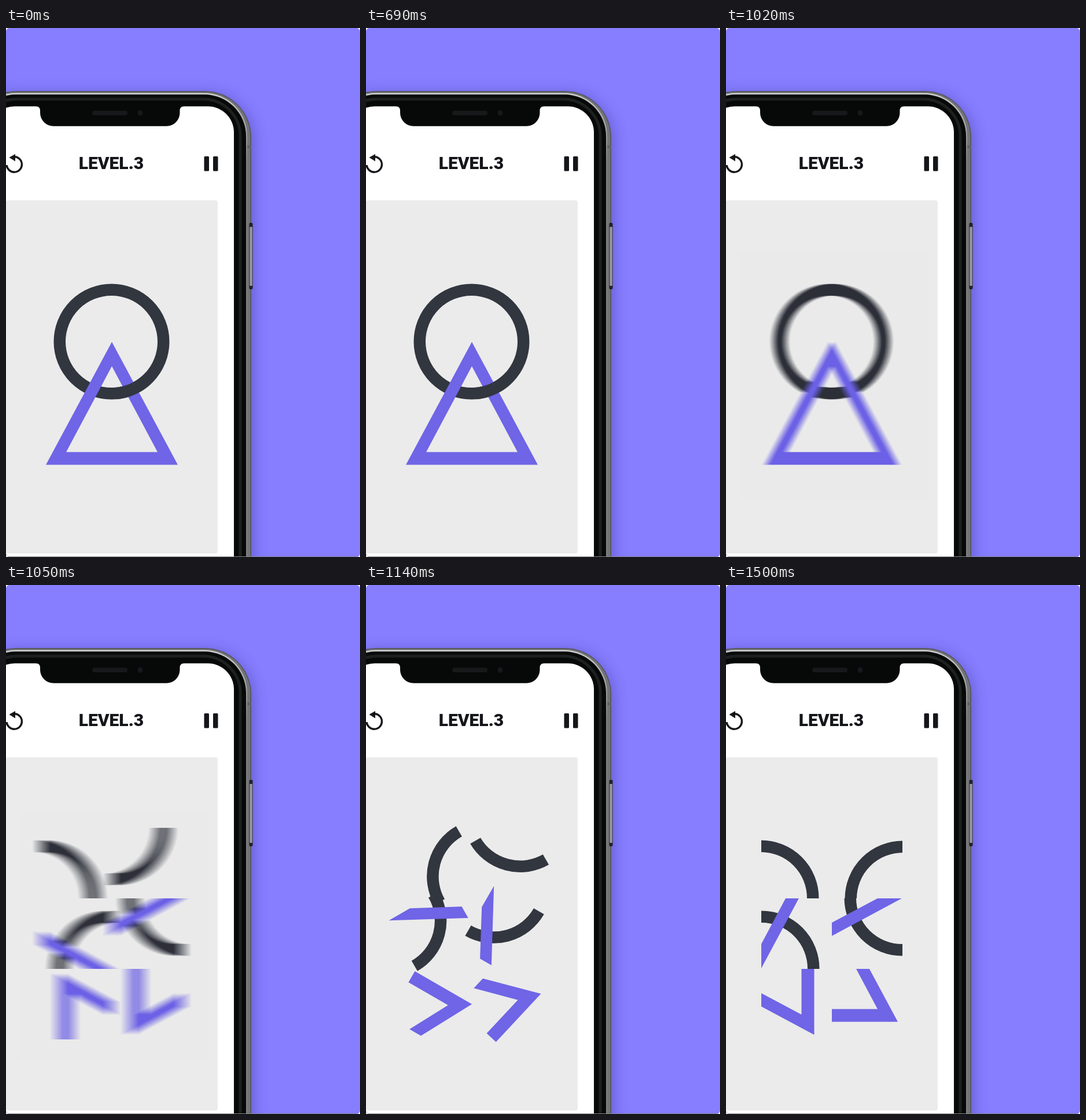
Write an HTML page with a canvas that moves like this. It is 612x915 px and loops after 1530 ms.

```html
<!DOCTYPE html>
<html lang="en">
<head>
<meta charset="utf-8">
<style>
html, body { margin: 0; width: 612px; height: 915px; overflow: hidden; background: #fff; }
canvas { display: block; }
</style>
</head>
<body>
<canvas id="stage" width="612" height="915"></canvas>
<script>
const W = 612, H = 915, LOOP = 1530, STEP = 30, TILE = 122;
const LEFT = 61, TOP = 420;
const INK = '#15161a', RING = '#31363f', PURPLE = '#6f65e6', PANEL = '#ebebeb';

const stage = document.getElementById('stage').getContext('2d');
const newLayer = () => {
  const c = document.createElement('canvas');
  c.width = W; c.height = H;
  return c.getContext('2d');
};
const backdrop = newLayer(), pieces = newLayer(), smear = newLayer();

function box(g, x, y, w, h, r, fill) {
  g.beginPath();
  g.roundRect(x, y, w, h, r);
  g.fillStyle = fill;
  g.fill();
}

function polygon(g, points) {
  points.forEach(([x, y], i) => i ? g.lineTo(x, y) : g.moveTo(x, y));
  g.closePath();
}

function gradient(g, x0, y0, x1, y1, stops) {
  const grad = g.createLinearGradient(x0, y0, x1, y1);
  stops.forEach(([at, color]) => grad.addColorStop(at, color));
  return grad;
}

function drawPhone(g) {
  // soft shadow and metal rim
  g.save();
  g.shadowColor = 'rgba(45,38,125,.38)';
  g.shadowBlur = 24;
  g.shadowOffsetX = 3;
  g.shadowOffsetY = 5;
  box(g, -62, 109, 486, 1000, 80, '#515255');
  g.restore();
  box(g, -61, 110.5, 483.5, 1000, 78, '#737477');
  box(g, -57, 112.5, 474, 1000, 74, gradient(g, 0, 112, 0, 230,
    [[0, '#cfd1d0'], [.45, '#a9abaa'], [1, '#7d7f80']]));
  box(g, -55, 115, 470, 1000, 72, '#070909');

  // sheen inside the bezel
  g.lineWidth = 5;
  g.strokeStyle = '#1c201f';
  g.beginPath();
  g.roundRect(-46, 123, 451, 1000, 64);
  g.stroke();

  // side button and antenna band
  box(g, 420.5, 337, 6, 115, 2, '#222326');
  box(g, 421, 344, 5, 102, 1, gradient(g, 421, 0, 426, 0,
    [[0, '#5f6063'], [.5, '#aaa9a9'], [1, '#69696d']]));
  box(g, 417, 203, 7, 5, 0, '#626367');

  // screen and notch
  box(g, -30, 135.5, 424, 1000, 45, '#fff');
  g.fillStyle = '#070909';
  g.beginPath();
  g.moveTo(51, 135);
  g.quadraticCurveTo(59, 135.5, 59, 143);
  g.arcTo(59, 169.7, 82, 169.7, 23);
  g.arcTo(300.5, 169.7, 300.5, 146, 23);
  g.lineTo(300.5, 143);
  g.quadraticCurveTo(300.5, 135.5, 308.5, 135);
  g.fill();
  box(g, 149, 143, 61, 8, 4, '#17181a');
  box(g, 227.5, 142.5, 9, 9, 4.5, '#17181c');
}

function drawInterface(g) {
  g.fillStyle = INK;
  g.font = '900 30px Roboto, sans-serif';
  g.fillText('LEVEL.3', 125.7, 244);

  box(g, 342.5, 222, 8.5, 25.5, 1.5, INK);
  box(g, 358, 222, 8.5, 25.5, 1.5, INK);

  g.strokeStyle = INK;
  g.lineWidth = 3.4;
  g.beginPath();
  g.arc(14.2, 236, 13.2, -Math.PI / 2, Math.PI * .97);
  g.stroke();
  g.beginPath();
  polygon(g, [[5.5, 224], [16, 218], [16, 230.5]]);
  g.fill();

  box(g, 0, 298, 366, 611, 4, PANEL);
  g.fillStyle = '#858585';
  g.fillRect(0, 914, W, 1);
}

function drawBackdrop(g) {
  g.beginPath();
  g.roundRect(0, 0, W, H, 6);
  g.clip();
  g.fillStyle = '#867dff';
  g.fillRect(0, 0, W, H);
  drawPhone(g);
  drawInterface(g);
}

function drawRing(g) {
  g.strokeStyle = RING;
  g.lineWidth = 20.5;
  g.beginPath();
  g.arc(182.5, 542.5, 89.75, 0, Math.PI * 2);
  g.stroke();
}

function drawFigure(g) {
  drawRing(g);
  g.fillStyle = PURPLE;
  g.beginPath();
  polygon(g, [[183, 543], [69, 755.5], [297, 755.5]]);
  polygon(g, [[183, 585], [104, 733.5], [262, 733.5]]);
  g.fill('evenodd');
}

function drawSolved(g) {
  drawFigure(g);
  // the ring passes over the right leg
  g.save();
  g.beginPath();
  g.rect(190, 595, 60, 60);
  g.clip();
  drawRing(g);
  g.restore();
}

// Clockwise degrees per tile, row by row.
const POSES = [
  [1020, [0, 0, 0, 0, 0, 0]],
  [1050, [90, 90, 90, 90, 90, 90]],
  [1110, [270, 90, 270, 360, 180, 289.5]],
  [1200, [450, 270, 180, 450, 270, 360]]
];

function tileAngle(index, t) {
  let angle = POSES[0][1][index];
  for (let i = 1; i < POSES.length; i++) {
    const [start, from] = POSES[i - 1], [end, to] = POSES[i];
    const k = Math.min(1, Math.max(0, (t - start) / (end - start)));
    angle += (to[index] - from[index]) * k;
  }
  return angle * Math.PI / 180;
}

function drawTiles(g, t) {
  for (let i = 0; i < 6; i++) {
    const cx = LEFT + (i % 2 + .5) * TILE;
    const cy = TOP + (Math.floor(i / 2) + .5) * TILE;
    g.save();
    g.translate(cx, cy);
    g.rotate(tileAngle(i, t));
    g.beginPath();
    g.rect(-TILE / 2, -TILE / 2, TILE, TILE);
    g.clip();
    g.translate(-cx, -cy);
    drawFigure(g);
    g.restore();
  }
}

// Running average of shifted opaque copies gives a horizontal motion blur.
function drawSmeared(g, t, width) {
  const copies = 17, x = 20, y = 390, w = 330, h = 430;
  pieces.fillStyle = PANEL;
  pieces.fillRect(0, 0, W, H);
  drawTiles(pieces, t);
  for (let i = 0; i < copies; i++) {
    smear.globalAlpha = 1 / (i + 1);
    smear.drawImage(pieces.canvas, (i / (copies - 1) - .5) * width, 0);
  }
  g.drawImage(smear.canvas, x, y, w, h, x, y, w, h);
}

function blurWidth(t) {
  return t < 1110 ? 30 * (1 - Math.abs(t - 1050) / 60) : 0;
}

function render(time) {
  const t = Math.floor(time % LOOP / STEP) * STEP;
  stage.clearRect(0, 0, W, H);
  stage.drawImage(backdrop.canvas, 0, 0);
  if (t < 1020) drawSolved(stage);
  else if (blurWidth(t) > 0) drawSmeared(stage, t, blurWidth(t));
  else drawTiles(stage, t);
}

drawBackdrop(backdrop);
const began = performance.now();
function tick() {
  render(performance.now() - began);
  requestAnimationFrame(tick);
}
tick();
</script>
</body>
</html>
```
